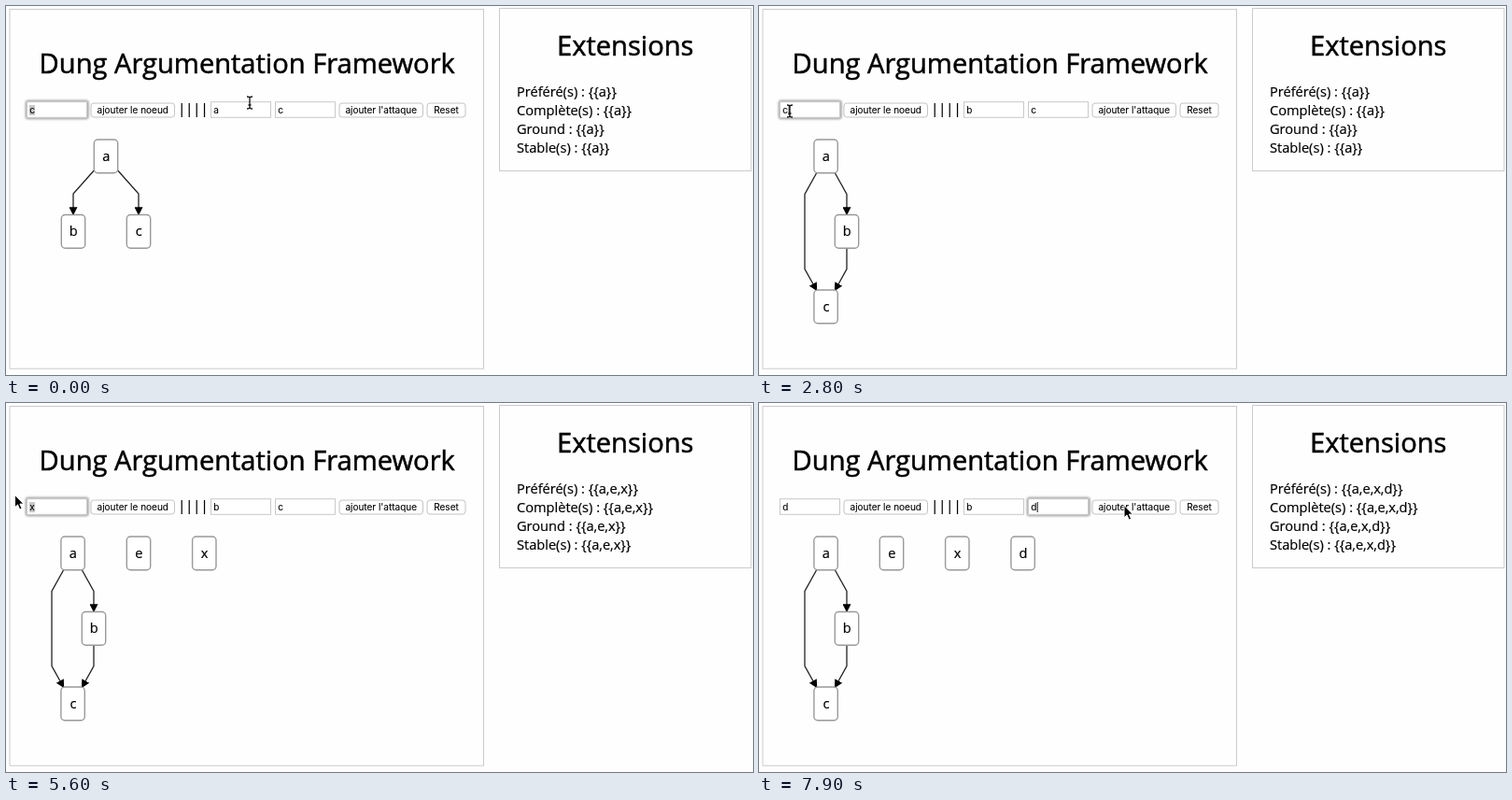
Write an HTML page that moves like this. It is 800 by 395 pixels and loops after 8 s.

```html
<!DOCTYPE html>
<html lang="fr">
<head>
<meta charset="utf-8">
<title>Argumentation</title>
<style>
  html, body { margin: 0; width: 100%; height: 100%; overflow: hidden; background: #fefefe; }
  svg { display: block; width: 800px; height: 395px; }
  text { font: 14.6px "Open Sans", sans-serif; fill: #000; stroke: #000; stroke-width: .2px; white-space: pre; }
  .title { font-size: 29.1px; stroke-width: .5px; text-anchor: middle; }
  .ui { font: 10px Inter, Roboto, sans-serif; stroke-width: .1px; }
  .mid { text-anchor: middle; }
  .panel { fill: #fefefe; stroke: #cbcbcf; }
  .field { fill: #fff; stroke: #c9c9c9; }
  .ring { fill: none; stroke: #a4a4a4; stroke-width: 3px; filter: blur(.8px); }
  .button { fill: #fff; stroke: #c4c4c4; }
  .node { fill: #fff; stroke: #999; stroke-width: 1.4px; }
  .edge { fill: none; stroke: #222; stroke-width: 1.3px; }
</style>
</head>
<body>
<script>
const LOOP = 8000, STEP = 100;
const SELECT = 300;   // the old text is selected this long before typing
const TRAVEL = 300;   // from typing to the button
const REPLY = 500;    // from the click to new extensions

// Each edit: focus a field, select its text, type a letter, click the button at `to`.
const edits = [
  { field: 1, letter: 'b', focus: 200, type: 700, click: 1300, to: [405, 115] },
  { field: 0, letter: 'e', focus: 2700, type: 3200, click: 3500, to: [119.5, 109] },
  { field: 0, letter: 'x', focus: 4000, type: 4400, click: 4700, to: [119.5, 109] },
  { field: 0, letter: 'd', focus: 5200, type: 5800, click: 6300, to: [119.5, 109] },
  { field: 2, letter: 'd', focus: 7100, type: 7600, click: LOOP, to: [391, 109.5] }
];
const initial = ['c', 'a', 'c'];
const fieldX = [22.5, 219.5, 288.5];
const additions = edits.filter(e => e.field === 0);

// Pointer stops: time, x, y.
const stops = [[0, 261, 103.5], [2100, 51, 120], [2500, 51, 120]];
for (const { field, focus, type, click, to } of edits) {
  const x = fieldX[field];
  stops.push(
    [focus, x + 10.5, 112.5], [type - SELECT, x + 10.5, 112.5],
    [type - SELECT + 100, x - 13, 98.5], [type, x - 13, 98.5],
    [type + TRAVEL, ...to], [click + 100, ...to]
  );
}
stops.sort((a, b) => a[0] - b[0]);

function pointer(t) {
  const i = Math.max(1, stops.findIndex(s => s[0] >= t));
  const [t0, x0, y0] = stops[i - 1], [t1, x1, y1] = stops[i];
  const k = (t - t0) / (t1 - t0);
  return [x0 + (x1 - x0) * k, y0 + (y1 - y0) * k];
}

function el(parent, tag, attrs = {}, text) {
  const e = document.createElementNS('http://www.w3.org/2000/svg', tag);
  for (const k in attrs) e.setAttribute(k, attrs[k]);
  if (text !== undefined) e.textContent = text;
  parent.append(e);
  return e;
}
const rect = (p, x, y, width, height, cls, rx = 0) =>
  el(p, 'rect', { x, y, width, height, rx, class: cls });
const label = (p, x, y, str, cls = '') => el(p, 'text', { x, y, class: cls }, str);
const show = (e, on) => { e.style.display = on ? '' : 'none'; };

const svg = el(document.body, 'svg', { viewBox: '0 0 800 395' });
const tip = el(el(svg, 'defs'), 'marker', {
  id: 'tip', viewBox: '0 0 10 10', refX: 9, refY: 5, orient: 'auto',
  markerUnits: 'userSpaceOnUse', markerWidth: 9, markerHeight: 9
});
el(tip, 'path', { d: 'M0 0L10 5L0 10z' });

rect(svg, 4, 3.5, 507.5, 384.7, 'panel');
rect(svg, 528.5, 2.5, 269.5, 174, 'panel');
label(svg, 258.2, 72, 'Dung Argumentation Framework', 'title');
label(svg, 663.3, 53.3, 'Extensions', 'title');

const lines = ['Préféré(s)', 'Complète(s)', 'Ground', 'Stable(s)'].map((name, i) =>
  ({ name, text: label(svg, 547, 96.8 + i * 20.1, '') }));

label(svg, 184.3, 115.2, '||||');
[[91, 89.5, 'ajouter le noeud'], [357, 89.5, "ajouter l'attaque"], [451, 41, 'Reset']]
  .forEach(([x, w, str]) => {
    rect(svg, x, 104, w, 15, 'button', 3);
    label(svg, x + w / 2, 115.2, str, 'ui mid');
  });

const fields = fieldX.map(x => {
  const ring = rect(svg, x - .3, 102.2, 65, 17.6, 'ring', 1.5);
  rect(svg, x, 102.7, 64, 16.6, 'field');
  const mark = el(svg, 'rect', { x: x + 2.5, y: 106, width: 6, height: 11, fill: '#c8c8c8' });
  const text = label(svg, x + 2.8, 115.2, '', 'ui');
  const caret = el(svg, 'rect', { x: x + 9.2, y: 106, width: 1, height: 11, fill: '#111' });
  return { ring, mark, text, caret };
});

function node(p, name, x, y) {
  const g = el(p, 'g');
  rect(g, x - 12.7, y - 18, 25.4, 35.8, 'node', 4);
  label(g, x + .3, y + 4.8, name, 'mid');
  return g;
}
const edge = (p, d) => el(p, 'path', { d, class: 'edge', 'marker-end': 'url(#tip)' });

const fork = el(svg, 'g');
edge(fork, 'M94.3 176L72 201V223.3');
edge(fork, 'M119.7 176L142 201V223.3');
node(fork, 'a', 107, 161);
node(fork, 'b', 72, 241.5);
node(fork, 'c', 142, 241.5);

const chain = el(svg, 'g');
edge(chain, 'M61.5 179L49 201.5V281.5L61.8 304.5');
edge(chain, 'M81.5 179L94 201.5V223.3');
edge(chain, 'M94 259.5V281.5L81.3 304.5');
node(chain, 'a', 71.6, 161);
node(chain, 'b', 94, 241.5);
node(chain, 'c', 71.6, 322);

const extras = additions.map(({ letter }, i) => node(svg, letter, 142 + i * 70.3, 161));

const arrow = el(svg, 'path', {
  d: 'M0 0V13.2L3 10.4L5.3 15.6L7.6 14.6L5.4 9.6H9.4z',
  fill: '#000', stroke: '#fff', 'stroke-linejoin': 'round'
});
const beam = el(svg, 'path', {
  d: 'M-3 -6.5Q0 -6.5 0 -5V5Q0 6.5 -3 6.5M3 -6.5Q0 -6.5 0 -5V5Q0 6.5 3 6.5M-1.5 2.5H1.5',
  fill: 'none', stroke: '#111', 'stroke-width': 1.3
});

function draw(time) {
  const t = Math.floor(time % LOOP / STEP) * STEP;

  // Before the first edit the node field is still selected.
  const edit = edits.findLast(e => e.focus <= t) || { field: 0, type: SELECT, click: LOOP };
  const selected = t >= edit.type - SELECT && t < edit.type;
  fields.forEach((f, i) => {
    const active = i === edit.field && t < edit.click;
    const typed = edits.findLast(e => e.field === i && e.type <= t);
    f.text.textContent = typed ? typed.letter : initial[i];
    show(f.ring, active);
    show(f.mark, active && selected);
    show(f.caret, active && !selected);
  });

  const known = additions.filter(e => e.click + REPLY <= t).map(e => e.letter);
  const set = ['a', ...known].join();
  for (const { name, text } of lines) text.textContent = `${name} : {{${set}}}`;

  const linked = t >= edits[0].click;
  show(fork, !linked);
  show(chain, linked);
  extras.forEach((g, i) => show(g, t >= additions[i].click));

  const [x, y] = pointer(t);
  const inside = y > 102 && y < 119.5 && fieldX.some(left => x > left && x < left + 64);
  show(beam, inside);
  show(arrow, !inside);
  (inside ? beam : arrow).setAttribute('transform', `translate(${x} ${y})`);
}

const begin = performance.now();
function tick() {
  draw(performance.now() - begin);
  requestAnimationFrame(tick);
}
tick();
</script>
</body>
</html>
```
